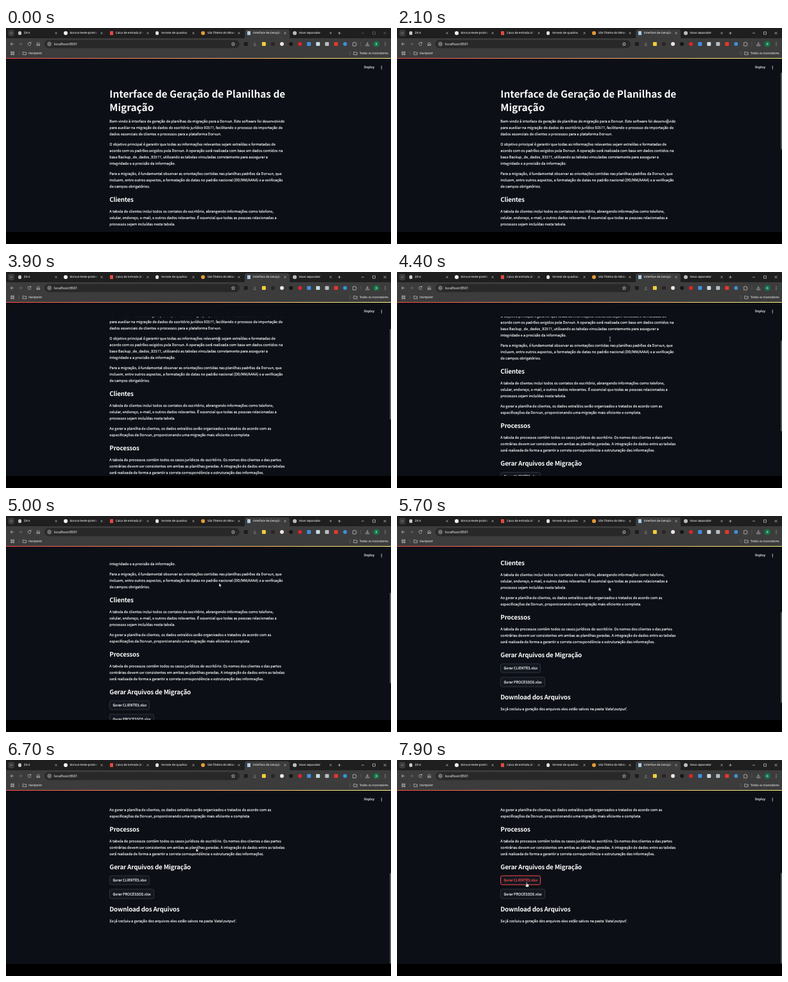
Animation, 600 px wide and 338 px high, one loop 8 s. Source, as an HTML page:

```html
<!DOCTYPE html>
<html lang="pt-BR">
<head>
<meta charset="utf-8">
<title>Interface de Geração</title>
<style>
@property --s { syntax: '<number>'; inherits: true; initial-value: 0; }
html { font-size: 6.25px; }
html, body { margin: 0; width: 600px; height: 338px; overflow: hidden; background: #000; }
body { position: relative; text-rendering: geometricPrecision; white-space: nowrap; }
svg { display: block; }
.layer { position: absolute; left: 0; top: 0; }

/* browser */
.chrome { position: absolute; inset: 0 0 auto; height: 47px; background: #3c3c3c; color: #e3e3e3;
  font: 4.5px/6px "Open Sans", "Noto Sans", sans-serif; -webkit-text-stroke: .08px; }
.chrome::after { content: ""; position: absolute; left: 0; top: 47px; width: 100%; height: 1px;
  background: linear-gradient(90deg, #ff4b4b, #fffd80); }
.tabs { height: 16px; background: #1f1f1f; }
.tab { position: absolute; top: 2px; width: 70px; height: 14px; border-radius: 4px 4px 0 0; }
.tab.on { background: #3c3c3c; }
.tab i { position: absolute; left: 4px; top: 3.2px; width: 5.6px; height: 5.6px; }
.tab span { position: absolute; left: 13.4px; top: 3.4px; width: 44px; overflow: hidden;
  mask-image: linear-gradient(90deg, #000 88%, transparent); }
.dot { border-radius: 50%; }
.url { position: absolute; left: 75px; top: 21px; font-size: 5.4px; line-height: 8px; }
.mark { position: absolute; top: 36.5px; }

/* page */
.view { position: absolute; top: 47.75px; width: 600px; height: 271px; overflow: hidden; background: #0c0f16;
  color: #fafafa; font-family: "Noto Sans CJK JP", "Noto Sans CJK SC", "Noto Sans CJK KR", "Noto Sans", sans-serif;
  animation: scroll 8s step-end infinite; }
.page { position: absolute; left: 161.3px; top: 6rem; transform: translateY(calc(var(--s) * -1px)); }
.page > * { margin: 0; }
p, button, .deploy { -webkit-text-stroke: .14px; }
h1 { padding: 1.25rem 0 1rem; font-size: 2.464rem; line-height: 3.3rem; font-weight: 700; }
h3 { padding: .5rem 0 1rem; font-size: 1.568rem; line-height: 2.1rem; font-weight: 600; letter-spacing: -.02em; }
p { font-size: .896rem; line-height: 1.6rem; }
.page p { margin-bottom: 1rem; }
button { display: block; box-sizing: border-box; height: 2.5rem; padding: 0 4.2px;
  font-family: inherit; font-size: .896rem; line-height: 1.6rem; text-rendering: inherit;
  color: #fafafa; background: #131720; border: 1px solid #2f333b; border-radius: .5rem; }
.page button { margin-bottom: 1rem; }
.hot { animation: hot 8s step-end infinite; }
.link { display: inline-block; margin-left: 3.5px; opacity: 0; animation: link 8s step-end infinite; }
.head { position: absolute; inset: 0 0 auto; height: 22.5px; background: #0c0f16; }
.deploy { position: absolute; left: 558px; top: 9px; font-size: .784rem; line-height: 10px; }
.thumb { position: absolute; right: 0; width: 2.4px; height: 142px; border-radius: 1.2px; background: #54575c;
  transform: translateY(calc(var(--s) * .524px)); }
.wake { animation: wake 8s step-end infinite; }

/* pointer */
.pointer { animation: move 8s step-end infinite; }
.pointer path { stroke-width: .6; animation: shape 8s step-end infinite; }

@keyframes scroll {
  0% { --s: 0; }
  38.75% { --s: 20; } 40% { --s: 35; } 41.25% { --s: 39.06; }
  46.25% { --s: 59; } 47.5% { --s: 74; } 48.75% { --s: 78.13; }
  53.75% { --s: 98; } 55% { --s: 113; } 56.25% { --s: 117.2; }
  62.5% { --s: 137.4; } 63.75% { --s: 152; } 65% { --s: 156.25; }
  67.5% { --s: 176; } 68.75% { --s: 191; } 70% { --s: 195.3; }
  75% { --s: 204; } 76.25% { --s: 221.4; } 77.5% { --s: 234.4; }
  81.25% { --s: 240; } 82.5% { --s: 245.4; }
}
@keyframes wake { 0% { opacity: var(--idle); } 20%, 100% { opacity: 1; } }
@keyframes move {
  0% { opacity: 0; transform: translate(571px, 215px); }
  20% { opacity: 1; transform: translate(571px, 215px); animation-timing-function: steps(8); }
  30% { transform: translate(332px, 104.7px); }
  67.5% { transform: translate(332px, 104.7px); animation-timing-function: steps(7); }
  76.25% { transform: translate(327.5px, 120px); }
  81.25% { transform: translate(327.5px, 120px); animation-timing-function: steps(8); }
  91.25%, 100% { transform: translate(202px, 190.7px); }
}
@keyframes shape {
  0% { stroke: #ddd; d: path("M-1.3-2.8H1.3M0-2.8V3.2M-1.3 3.2H1.3"); }
  60% { stroke: #000; d: path("M0 0V6.3L1.5 5L2.5 7L3.4 6.6L2.5 4.6H4.4Z"); }
  92.5%, 100% { stroke: #000; d: path("M-.7 .4Q0-.4 .7 .4V3L3.6 3.8V6L2.9 8H-.7L-2.4 5.2L-1.9 4.5L-.7 5.3Z"); }
}
@keyframes link { 0% { opacity: 0; } 27.5% { opacity: 1; } 43.75% { opacity: 0; } }
@keyframes hot {
  0% { color: #fafafa; border-color: #2f333b; }
  95% { color: #fafafa; border-color: #2f333b; animation-timing-function: steps(4, start); }
  100% { color: #ff4b4b; border-color: #ff4b4b; }
}
</style>
</head>
<body>
<div class="view">
  <div class="page">
    <h1>Interface de Geração de Planilhas de<br>Migração<svg class="link" width="7" height="5" viewBox="0 0 7 5" fill="none" stroke="#8b8e94" stroke-width=".8"><path d="M3 .9H2a1.6 1.6 0 0 0 0 3.2H3M4 .9H5a1.6 1.6 0 0 1 0 3.2H4M2.2 2.5H4.8"/></svg></h1>
    <p>Bem-vindo à interface de geração de planilhas de migração para a Dorvun. Este software foi desenvolvido<br>para auxiliar na migração de dados do escritório jurídico 92577, facilitando o processo de importação de<br>dados essenciais de clientes e processos para a plataforma Dorvun.</p>
    <p>O objetivo principal é garantir que todas as informações relevantes sejam extraídas e formatadas de<br>acordo com os padrões exigidos pela Dorvun. A operação será realizada com base em dados contidos na<br>base Backup_de_dados_92577, utilizando as tabelas vinculadas corretamente para assegurar a<br>integridade e a precisão da informação.</p>
    <p>Para a migração, é fundamental observar as orientações contidas nas planilhas padrões da Dorvun, que<br>incluem, entre outros aspectos, a formatação de datas no padrão nacional (DD/MM/AAAA) e a verificação<br>de campos obrigatórios.</p>
    <h3>Clientes</h3>
    <p>A tabela de clientes inclui todos os contatos do escritório, abrangendo informações como telefone,<br>celular, endereço, e-mail, e outros dados relevantes. É essencial que todas as pessoas relacionadas a<br>processos sejam incluídas nesta tabela.</p>
    <p>Ao gerar a planilha de clientes, os dados extraídos serão organizados e tratados de acordo com as<br>especificações da Dorvun, proporcionando uma migração mais eficiente e completa.</p>
    <h3>Processos</h3>
    <p>A tabela de processos contém todos os casos jurídicos do escritório. Os nomes dos clientes e das partes<br>contrárias devem ser consistentes em ambas as planilhas geradas. A integração de dados entre as tabelas<br>será realizada de forma a garantir a correta correspondência e estruturação das informações.</p>
    <h3>Gerar Arquivos de Migração</h3>
    <button class="hot">Gerar CLIENTES.xlsx</button>
    <button>Gerar PROCESSOS.xlsx</button>
    <h3>Download dos Arquivos</h3>
    <p>Se já cocluiu a geração dos arquivos eles estão salvos na pasta 'data\output'.</p>
  </div>
  <div class="thumb wake" style="--idle:0"></div>
  <div class="head">
    <div class="deploy">Deploy</div>
    <svg class="layer" width="600" height="22" fill="#fafafa"><circle cx="585.3" cy="11.9" r=".7"/><circle cx="585.3" cy="14" r=".7"/><circle cx="585.3" cy="16.1" r=".7"/></svg>
  </div>
</div>

<div class="chrome">
  <div class="tabs"></div>
  <svg class="layer" width="600" height="48" fill="none" stroke="#d0d0d0" stroke-width=".7">
    <rect x="3.5" y="3" width="9.5" height="10" rx="3" fill="#3c3c3c" stroke="none"/>
    <path d="M6.6 7.2L8.2 8.8L9.8 7.2M517.3 8H521.7M519.5 5.8V10.2"/>
    <path class="wake" style="--idle:.45" d="M554 8H558M571.5 6H575.5V10H571.5ZM588.5 6L592.5 10M592.5 6L588.5 10"/>
    <path d="M12 25H7M9.4 22.6L7 25L9.4 27.4"/>
    <path stroke="#777" d="M20 25H25M22.6 22.6L25 25L22.6 27.4"/>
    <path d="M38.6 23.6A2.4 2.4 0 1 0 38.9 25.6M38.8 22V23.9H36.9M48 27.5V24.4L50.2 22.4L52.4 24.4V27.5H51V25.6H49.4V27.5Z"/>
    <rect x="60" y="18.8" width="304" height="12.6" rx="6.3" fill="#282828" stroke="none"/>
    <circle cx="67.6" cy="25" r="4.6" fill="#3c3c3c" stroke="none"/>
    <circle cx="67.6" cy="25" r="2.3"/><path d="M67.6 24.6V26.3M67.6 23.5V24"/>
    <path d="M354 22.4L354.8 24.2L356.7 24.4L355.3 25.7L355.7 27.6L354 26.6L352.3 27.6L352.7 25.7L351.3 24.4L353.2 24.2Z"/>
    <g class="ext" stroke="none"></g>
    <path stroke="#888" d="M387.8 22.4V26M386.2 24.6L387.8 26.2L389.4 24.6M385.6 27.6H390"/>
    <path d="M540.3 23.2H542A1 1 0 0 1 544 23.2H545.4V24.6A1 1 0 0 1 545.4 26.6V28H540.3V26.4A1 1 0 0 0 540.3 24.6Z"/>
    <path stroke="#666" d="M553 22V28M20.3 36.5V42.5M536 36.5V42.5"/>
    <path d="M563.2 22V26M561.4 24.4L563.2 26.2L565 24.4M560.6 26.2V27.8H565.8V26.2"/>
    <circle cx="577.2" cy="25" r="4.6" fill="#14784a" stroke="none"/>
    <path stroke="#fff" stroke-width=".5" d="M576.2 26.5L577.2 23.6L578.2 26.5M576.6 25.6H577.8"/>
    <path stroke-width="1.2" stroke-linecap="round" d="M591 22.8V22.81M591 25V25.01M591 27.2V27.21"/>
    <path d="M7.7 37.2H9.4V38.9H7.7ZM10.8 37.2H12.5V38.9H10.8ZM7.7 40.3H9.4V42H7.7ZM10.8 40.3H12.5V42H10.8Z"/>
    <path d="M26.2 37.5H28.2L28.9 38.2H31.6V41.8H26.2ZM541.8 37.5H543.8L544.5 38.2H547.2V41.8H541.8Z"/>
  </svg>
  <div class="url">localhost:8501</div>
  <div class="mark" style="left:35px">Startpoint</div>
  <div class="mark" style="left:551px">Todos os marcadores</div>
</div>

<svg class="layer" width="600" height="338"><g class="pointer"><path fill="#fff"/></g></svg>

<script>
// title, icon colour, icon shape
const tabs = [
  ['ZK-4', '#c8cacd', 'dot'],
  ['dorvun-teste-pratico', '#f0f0f0', 'dot'],
  ['Caixa de entrada (4 1', '#e04a3f', ''],
  ['torneio de quadras', '#dfe3ea', 'dot'],
  ['São Tibério do Mirau', '#e39a35', 'dot'],
  ['Interface de Geração', '#a9cbe6', ''],
  ['Novo separador', '#b9bbbe', 'dot']
];
const cross = '<svg class="layer" width="70" height="14" stroke="#d0d0d0" stroke-width=".6">' +
  '<path d="M61.4 4.4L64.6 7.6M64.6 4.4L61.4 7.6"/></svg>';
document.querySelector('.tabs').innerHTML = tabs.map(([title, color, shape], i) =>
  `<div class="tab ${i === 5 ? 'on' : ''}" style="left:${14.7 + 71.4 * i}px">
    <i class="${shape}" style="background:${color}"></i><span>${title}</span>${cross}</div>`).join('');

// extension buttons: corner radius, colour
const exts = [[1, '#1d1d1d'], null, [1, '#f2cf3a'], [3, '#2a2522'], [3, '#f1e4e2'], [3, '#151515'],
  [3, '#e0252b'], [1, '#3d8fe0'], [1, '#c9dbe0'], [1, '#b8bcc0'], [1, '#e5372c'], [3, '#3f8fd8']];
document.querySelector('.ext').innerHTML = exts.map((e, i) => e ?
  `<rect x="${370.8 + 14.05 * i}" y="22" width="6" height="6" rx="${e[0]}" fill="${e[1]}"/>` : '').join('');
</script>
</body>
</html>
```
